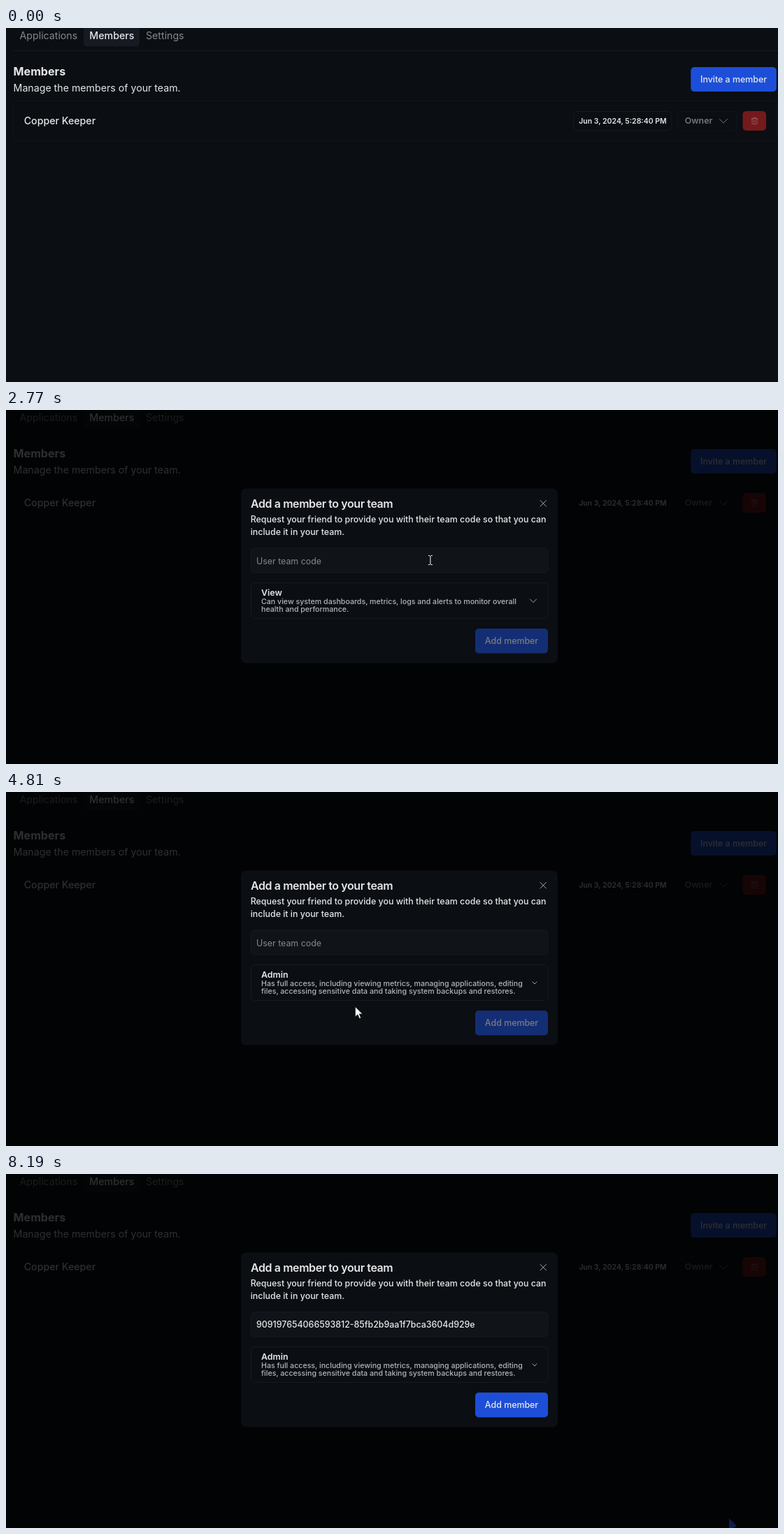
An HTML page for the animation above (8260 ms loop, 1104 px wide and 507 px high).

```html
<!DOCTYPE html>
<html lang="en">
<head>
<meta charset="utf-8">
<title>Invite a member</title>
<style>
  html, body { margin: 0; width: 100%; height: 100%; overflow: hidden; background: #0b0e12; }
  svg { display: block; width: 1104px; height: 507px; font-family: Inter, sans-serif; font-size: 12.4px; font-weight: 500; fill: #e6e7ea; }
  .base { font-size: 14.18px; }
  .regular { font-weight: 400; }
  .head { font-size: 15.95px; font-weight: 600; }
  .strong { font-weight: 600; }
  .note { font-size: 10.63px; fill: #b4b6ba; }
  .item-note { font-size: 9.75px; fill: #b4b6ba; }
  .muted { fill: #85888d; }
  .mid { text-anchor: middle; }
  .box { fill: none; stroke: #171a20; }
  .icon { fill: none; stroke: #a4a6aa; stroke-linecap: round; stroke-linejoin: round; }
  .pointer { fill: #fff; stroke: #111; stroke-width: .9; stroke-linejoin: round; }
</style>
</head>
<body>
<svg viewBox="0 0 1104 507">
  <g id="page">
    <rect x="111" y="-8" width="80" height="34.5" rx="5" fill="#161a23"/>
    <text class="base regular muted" x="19.6" y="16">Applications</text>
    <text class="base" x="119.3" y="16">Members</text>
    <text class="base regular muted" x="200" y="16">Settings</text>
    <path class="box" d="M11 32.5H1104"/>
    <text class="head" style="font-size:16.1px;font-weight:700" x="10.6" y="68">Members</text>
    <text class="base regular" x="10.6" y="91">Manage the members of your team.</text>
    <rect id="invite" x="979.3" y="56.1" width="122.5" height="35" rx="5"/>
    <text class="mid" x="1040.5" y="78">Invite a member</text>
    <rect class="box" x="10.5" y="104.5" width="1092" height="57.5" rx="7" style="stroke:#12151a"/>
    <text class="base" x="25.7" y="138">Copper Keeper</text>
    <rect class="box" x="811.5" y="119.5" width="140.5" height="27.5" rx="5"/>
    <text class="mid" style="font-size:10.5px;font-weight:600" x="882" y="136.5">Jun 3, 2024, 5:28:40 PM</text>
    <rect class="box" x="960.5" y="119.5" width="85" height="27.5" rx="5" style="stroke:#12151a"/>
    <text class="strong" x="970.7" y="137.3" fill="#767779">Owner</text>
    <path class="icon" d="M1020.5 130.5L1026 136L1031.5 130.5" style="stroke:#767779"/>
    <rect x="1053.5" y="119" width="33.5" height="28" rx="5" fill="#741a1c"/>
    <path class="icon" d="M1066 130H1075M1067 130V136.5Q1067 137.5 1068 137.5H1073Q1074 137.5 1074 136.5V130M1068.5 130V128.5H1072.5V130M1069.5 132.5V135M1071.5 132.5V135" style="stroke:#9c6567;stroke-width:.8"/>
    <rect y="505" width="1104" height="2" fill="#1b0a10"/>
  </g>

  <rect id="backdrop" width="1104" height="507" fill="#000"/>

  <g id="modal">
    <rect x="336" y="112.5" width="453" height="250" rx="7" fill="#0b0e12"/>
    <text class="head" style="letter-spacing:-.024em" x="350" y="140">Add a member to your team</text>
    <path class="icon" d="M764 129.5L772.5 138M772.5 129.5L764 138"/>
    <text x="349.7" y="161">Request your friend to provide you with their team code so that you can</text>
    <text x="349.7" y="179">include it in your team.</text>
    <rect class="box" x="350.5" y="198" width="424.5" height="35" rx="5" style="fill:#101318"/>
    <text id="code" x="358"></text>
    <rect id="caret" y="207.5" width="1" height="15" fill="#fff"/>
    <rect id="select" class="box" x="350.5" y="247.5" width="424.5" height="51" rx="5"/>
    <text id="role" class="strong" x="365" y="266"></text>
    <text id="roleNote1" class="note" x="365" y="278.3"></text>
    <text id="roleNote2" class="note" x="365" y="289.1"></text>
    <path id="chevron" class="icon"/>
    <g id="add">
      <rect id="addFill" x="671" y="313" width="104" height="35.4" rx="5"/>
      <text class="mid" x="723" y="335.3">Add member</text>
    </g>
  </g>

  <g id="menu">
    <rect class="box" x="350.5" y="303" width="424.5" height="200.5" rx="5" style="fill:#0a0d11"/>
    <rect id="hoverItem" x="354" y="307.5" width="417" height="45" rx="4" fill="#141821"/>
    <g id="items"></g>
  </g>

  <path id="trace" d="M1034 493L1045 504L1040 507H1034Z" fill="#0c1d4c"/>
  <circle id="press" r="11.5" fill="#eee628" opacity=".65"/>
  <g id="cursor">
    <path id="arrow" class="pointer" d="M0 0V15L3.6 11.7L6 17.4L8.4 16.4L6 10.9H10.8Z"/>
    <path id="hand" class="pointer" transform="translate(0 -.5) scale(.92)" d="M-1.5 1.2Q0 -.8 1.5 1.2V7Q3 6 4.3 7.5Q6 7 7 8.6Q9 8.2 9.3 10V14Q9 17 7.5 20H-.5Q-2 17 -5 13.5Q-6 11 -3.6 11L-1.5 12.5Z"/>
    <path id="beam" d="M-3 -6.5H-1L0 -5.5L1 -6.5H3M0 -5.5V5.5M-3 6.5H-1L0 5.5L1 6.5H3" fill="none" stroke="#fff"/>
  </g>
</svg>
<script>
const LOOP = 8260;
const OPEN_MODAL = 2090, OPEN_MENU = 3230, CLOSE_MENU = 4540, FOCUS = 5140, PASTE = 5730;
const BLUE = '#1d4ed8', BLUE_HOVER = '#1e40af';
const CODE = '909197654066593812-85fb2b9aa1f7bca3604d929e';

const VIEW = ['View', 'Can view system dashboards, metrics, logs and alerts to monitor overall', 'health and performance.'];
const ADMIN = ['Admin', 'Has full access, including viewing metrics, managing applications, editing', 'files, accessing sensitive data and taking system backups and restores.'];
const MENU = [
  ['Admin', 'Has full access, including viewing metrics, managing applications, editing files,', 'accessing sensitive data and taking system backups and restores.'],
  ['Maintain', 'In addition to manager permissions, can upload, download and edit application files', 'and configurations.'],
  ['Manager', 'In addition to view permissions, can control application lifecycles by starting,', 'stopping and restarting services.'],
  ['View', 'Can view system dashboards, metrics, logs and alerts to monitor overall health and', 'performance.']
];

// time, x, y
const PATH = [
  [70, 1062, 405], [250, 1060, 270], [450, 1053, 125], [690, 1051, 80],
  [890, 1051, 80], [960, 1050, 78], [2120, 1050, 78],
  [2400, 860, 125], [2600, 680, 185], [2770, 607, 215], [2910, 590, 222],
  [2980, 580, 232], [3150, 548, 262], [3330, 544, 264], [3500, 535, 290],
  [3800, 521, 324], [3870, 521, 324], [4010, 521, 337], [4600, 521, 337],
  [4810, 499.5, 307.5], [5000, 460, 243], [5140, 450, 215], [5370, 450, 215],
  [5700, 540, 220], [5830, 595, 237], [5980, 690, 270],
  [6190, 722, 297], [6250, 727, 303], [6390, 738, 326], [7650, 738, 326],
  [7860, 1010, 470], [7930, 1036, 494]
];
const PRESSES = [[1820, 2090], [3190, 3270], [4470, 4540], [5110, 5180]];

const el = {};
document.querySelectorAll('[id]').forEach(node => el[node.id] = node);

el.items.innerHTML = MENU.map(([name, ...notes], i) => {
  const y = 324 + i * 48.1;
  return `<text class="strong" x="361.5" y="${y}">${name}</text>` +
    notes.map((note, k) => `<text class="item-note" x="361.5" y="${y + 11.5 + k * 10}">${note}</text>`).join('');
}).join('');

const progress = (t, start, length) => Math.min(1, Math.max(0, (t - start) / length));
const easeOut = p => 1 - (1 - p) ** 2;
const show = (node, on) => node.style.display = on ? '' : 'none';
const inside = ([x, y], left, top, right, bottom) => x >= left && x <= right && y >= top && y <= bottom;

function cursorAt(t) {
  const next = PATH.findIndex(p => p[0] > t);
  if (next < 0) return PATH[PATH.length - 1].slice(1);
  if (next === 0) return PATH[0].slice(1);
  const [t0, x0, y0] = PATH[next - 1], [t1, x1, y1] = PATH[next];
  const p = (t - t0) / (t1 - t0);
  return [x0 + (x1 - x0) * p, y0 + (y1 - y0) * p];
}

// Fades a panel in while it grows around the given anchor.
function popIn(node, p, x, y) {
  const s = .95 + .05 * p;
  show(node, p > 0);
  node.style.opacity = p;
  node.setAttribute('transform', `translate(${x * (1 - s)} ${y * (1 - s)}) scale(${s})`);
}

function render(t) {
  const pos = cursorAt(t);
  const modalOpen = t >= OPEN_MODAL, pasted = t >= PASTE;
  const menuOpen = t >= OPEN_MENU && t < CLOSE_MENU;
  const onInvite = !modalOpen && t >= 70 && inside(pos, 979, 56, 1102, 91);
  const onInput = modalOpen && inside(pos, 350, 198, 775, 233);
  const onSelect = modalOpen && inside(pos, 350, 247, 775, 299);
  const onItem = menuOpen && inside(pos, 351, 304, 774, 503);
  const onAdd = pasted && inside(pos, 671, 313, 775, 348);

  const fade = easeOut(progress(t, OPEN_MODAL - 30, 200));
  el.backdrop.setAttribute('opacity', .8 * fade);
  popIn(el.modal, fade, 562, 237);
  popIn(el.menu, easeOut(progress(t, OPEN_MENU, 150)) * (1 - progress(t, CLOSE_MENU, 110)), 562, 303);

  el.invite.style.fill = onInvite ? BLUE_HOVER : BLUE;
  el.addFill.style.fill = onAdd ? BLUE_HOVER : BLUE;
  el.add.style.opacity = pasted ? 1 : .5;
  el.select.style.fill = onSelect || menuOpen ? '#131721' : 'none';
  show(el.hoverItem, onItem && pos[1] < 353);

  const admin = t >= CLOSE_MENU;
  [el.role.textContent, el.roleNote1.textContent, el.roleNote2.textContent] = admin ? ADMIN : VIEW;
  el.chevron.setAttribute('d', admin ? 'M753 272L756 275L759 272' : 'M749.5 271L754 275.5L758.5 271');

  el.code.textContent = pasted ? CODE : 'User team code';
  el.code.setAttribute('class', pasted ? '' : 'regular muted');
  el.code.setAttribute('y', pasted ? 220 : 220.7);
  const blinkStart = pasted ? PASTE : FOCUS;
  show(el.caret, t >= FOCUS && t < 8190 && Math.floor((t - blinkStart) / 530) % 2 === 0);
  el.caret.setAttribute('x', pasted ? 669 : 358);

  const kind = onInput ? 'beam' : onInvite || onSelect || onItem || onAdd ? 'hand' : 'arrow';
  ['arrow', 'hand', 'beam'].forEach(name => show(el[name], name === kind));
  const place = `translate(${pos.join(' ')})`;
  el.cursor.setAttribute('transform', place);
  el.press.setAttribute('transform', place);
  show(el.cursor, t >= 70 && t < 7930);
  show(el.press, PRESSES.some(([from, to]) => t >= from && t < to));
  show(el.trace, t >= 7930);
}

const start = performance.now();
function tick() {
  render((performance.now() - start) % LOOP);
  requestAnimationFrame(tick);
}
tick();
</script>
</body>
</html>
```
